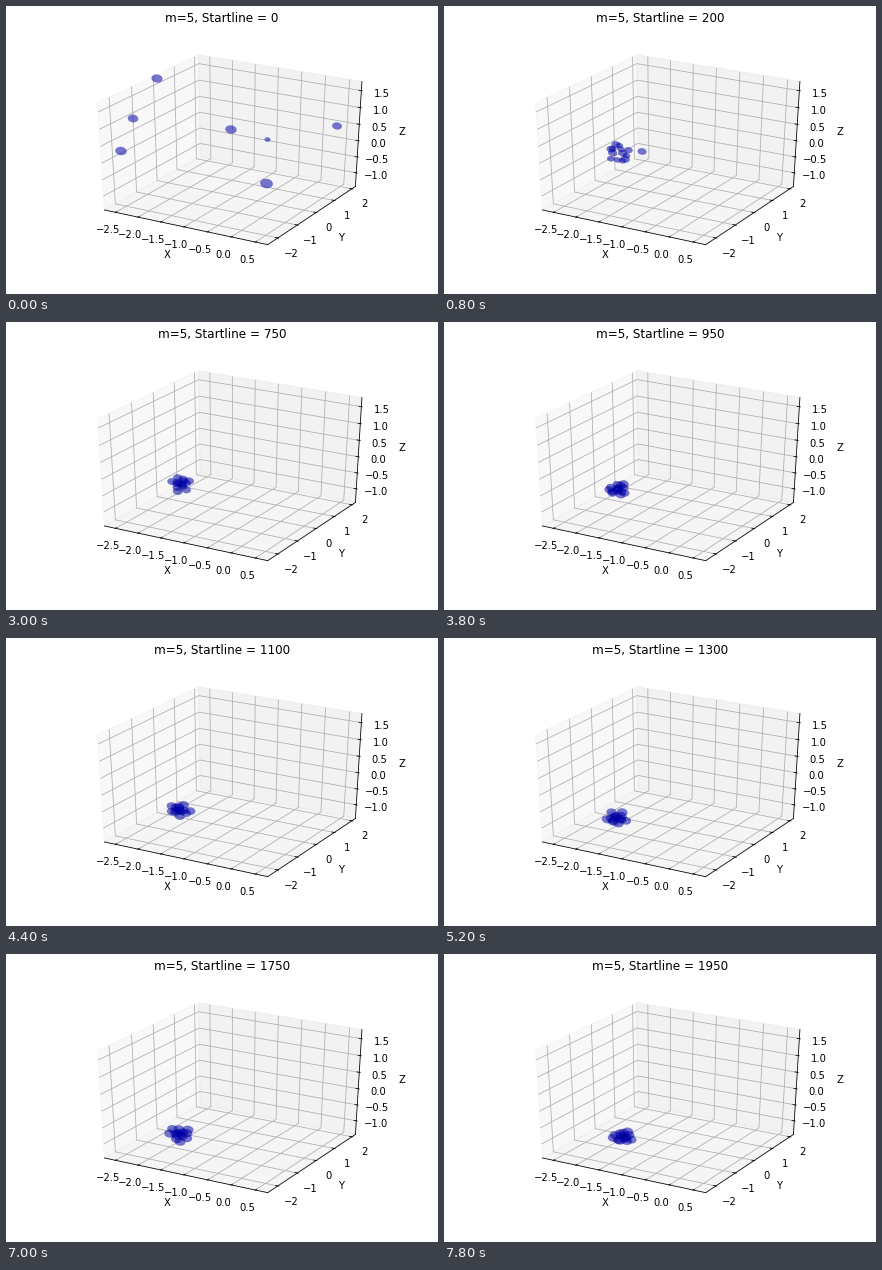
A matplotlib script for the animation above (8 s loop, 432 by 288 pixels).

```python
import numpy as np
import matplotlib.pyplot as plt
from matplotlib.animation import FuncAnimation
from matplotlib.patches import Ellipse, Polygon

W, H, DPI = 432, 288, 72
FRAMES, STEP_MS = 40, 200
ELEV, AZIM, DIST = np.radians(30), np.radians(-60), 10
BOX = (54, 36, 334.8, 217.44)
E = 0.5 + 1 / 48            # half side of the padded unit cube
DELTA = 1 / 12
PER_POINT = 48 / (BOX[2] + BOX[3]) * DELTA

LO = np.array([-2.68, -2.411, -1.369])
HI = np.array([0.683, 2.109, 1.702])
TICKS = (np.arange(-2.5, 0.6, 0.5), np.arange(-2, 3), np.arange(-1, 1.6, 0.5))
FORMATS = ("{:.1f}", "{:.0f}", "{:.1f}")


def project(p):
    """Centred cube coordinates to stage pixels, with y pointing up."""
    x, y, z = p
    ce, se, ca, sa = np.cos(ELEV), np.sin(ELEV), np.cos(AZIM), np.sin(AZIM)
    right = -sa * x + ca * y
    up = -se * (ca * x + sa * y) + ce * z
    depth = DIST - (ce * (ca * x + sa * y) + se * z)
    scale = 0.95 / DIST
    return (BOX[0] + BOX[2] * (right / depth + scale) / 0.185,
            BOX[1] + BOX[3] * (up / depth + scale) / 0.185)


fig = plt.figure(figsize=(W / DPI, H / DPI), dpi=DPI, facecolor="white")
ax = fig.add_axes([0, 0, 1, 1])
ax.set_xlim(0, W)
ax.set_ylim(0, H)
ax.axis("off")


def line(points, color, z, cap="butt"):
    xs, ys = zip(*(project(p) for p in points))
    ax.plot(xs, ys, color=color, lw=0.8, zorder=z, solid_capstyle=cap)


def pane(points, grey):
    ax.add_patch(Polygon([project(p) for p in points], closed=True, lw=1,
                         facecolor=(grey,) * 3, edgecolor=(grey,) * 3,
                         alpha=0.5, zorder=1))


def moved(p, axis, amount):
    """Push a point away from the cube centre, except along one axis."""
    q = np.array(p, float)
    for k in range(3):
        if k != axis:
            q[k] += amount * np.sign(q[k])
    return q


def at(p, axis, value):
    q = np.array(p, float)
    q[axis] = value
    return q


pane([(-E, -E, -E), (-E, E, -E), (-E, E, E), (-E, -E, E)], 0.95)
pane([(-E, E, -E), (E, E, -E), (E, E, E), (-E, E, E)], 0.9)
pane([(-E, -E, -E), (E, -E, -E), (E, E, -E), (-E, E, -E)], 0.925)

# The edge carrying each axis, and the two further corners of its grid lines
EDGES = ((0, -E, -E), (E, 0, -E), (E, E, 0))
GRIDS = (((0, E, -E), (0, E, E)), ((-E, 0, -E), (-E, 0, E)),
         ((-E, E, 0), (-E, -E, 0)))
TICK_DIRS = (1, 0, 0)

for k in range(3):
    edge, d = EDGES[k], TICK_DIRS[k]
    line([at(edge, k, -E), at(edge, k, E)], "black", 3, "projecting")
    ax.text(*project(moved(edge, k, 25 * PER_POINT)), "XYZ"[k],
            ha="center", va="center", fontsize=10, zorder=4)
    for value in TICKS[k]:
        t = (value - LO[k]) / (HI[k] - LO[k]) - 0.5
        foot = at(edge, k, t)
        line([foot] + [at(c, k, t) for c in GRIDS[k]], "#b0b0b0", 2)
        out = np.sign(edge[d]) * DELTA
        line([at(foot, d, edge[d] + 0.1 * out),
              at(foot, d, edge[d] - 0.2 * out)], "black", 3)
        label = FORMATS[k].format(value).replace("-", "\u2212")
        ax.text(*project(moved(foot, k, 11.5 * PER_POINT)), label,
                ha="center", va="top", fontsize=10, zorder=4)

# Opening balls: x, y from the top left, relative size
START = np.array([(151, 72.5, 1), (127, 112.5, 0.95), (115, 145, 1.03),
                  (225, 123.5, 1.02), (261.5, 133.5, 0.55),
                  (331, 120, 0.88), (260.5, 177.5, 1.15)])
# Drift of the cluster's centre
MOMENTS = (8, 15, 22, 30, 35, 39)
CENTRE_X = (174, 175, 173, 172, 174, 179)
CENTRE_Y = (148, 162, 172, 188, 180.5, 183)

COUNT = 14
rank = np.arange(COUNT)
reach = ((rank + 0.5) / COUNT) ** 0.75
heading = rank * np.pi * (3 - np.sqrt(5))
phase = np.random.default_rng(5).uniform(0, 2 * np.pi, (2, COUNT))

balls = [Ellipse((0, 0), 1, 1, angle=-8, facecolor=(0, 0, 0.65), alpha=0.53,
                 lw=0, zorder=5) for _ in rank]
for ball in balls:
    ax.add_patch(ball)
title = fig.suptitle("", fontsize=12, x=0.5, y=0.98, va="top")


def cluster(i):
    """A turning, wobbling swarm around the drifting centre."""
    widen = np.clip((i - 8) / 20, 0, 1)
    angle = heading + 0.3 * i
    wobble = 1.2 * np.sin(0.9 * i + phase)
    x = np.interp(i, MOMENTS, CENTRE_X) + wobble[0]
    y = np.interp(i, MOMENTS, CENTRE_Y) + wobble[1]
    x = x + (9 + 2.5 * widen) * reach * np.cos(angle)
    y = y + (8 - 1.5 * widen) * reach * np.sin(angle)
    return np.column_stack([x, y, np.full(COUNT, 0.8 + 0.18 * widen)])


def state(i):
    now = cluster(i)
    pull = np.exp(-i / 2)       # the opening balls fall into the swarm
    n = len(START)
    now[:n] += (START - now[:n]) * pull
    now[n:, 2] *= 1 - pull
    return now


def draw(i):
    for ball, (x, y, size) in zip(balls, state(i)):
        ball.set_center((x, H - y))
        ball.set_width(11.2 * size)
        ball.set_height(8.2 * size)
    title.set_text(f"m=5, Startline = {50 * i}")
    return balls + [title]


anim = FuncAnimation(fig, draw, frames=FRAMES, interval=STEP_MS,
                     init_func=lambda: draw(0), repeat=True, repeat_delay=0,
                     blit=False)
plt.show()
```
